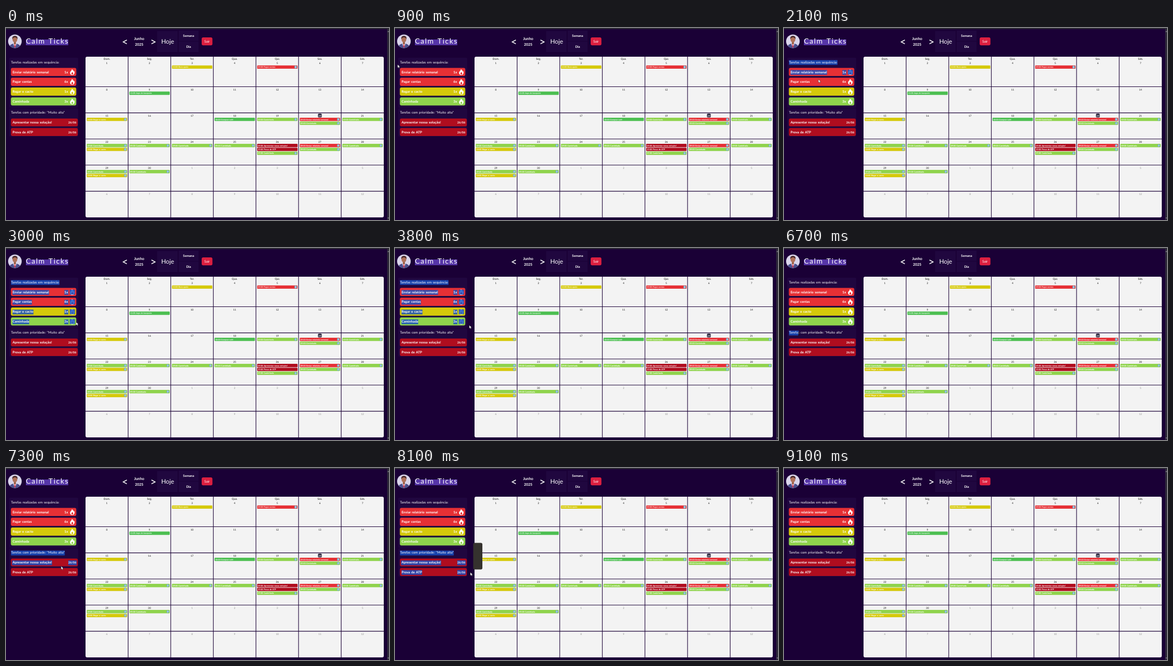
An HTML page for the animation above (9.4 s loop, 732x368 px).

```html
<!DOCTYPE html>
<html lang="pt">
<head>
<meta charset="utf-8">
<title>Agenda</title>
<style>
  html, body { margin: 0; width: 100%; height: 100%; overflow: hidden; background: #1a0036; }
  svg { display: block; }
  text { font-family: Lato, "Open Sans", sans-serif; word-spacing: .1em; white-space: pre; text-rendering: geometricPrecision; }
  .done { text-decoration: line-through; opacity: .75; }
</style>
</head>
<body>
<svg id="stage" width="732" height="368" viewBox="0 0 732 368"></svg>
<script>
const LOOP = 9400, STEP = 100;
const RED = '#e63035', YELLOW = '#d5c90b', LIME = '#8fd34c', GREEN = '#4dbf52', DARK = '#b00d1f';
const NIGHT = '#1a0036', PANEL = '#20073f';
const stage = document.getElementById('stage');

const rect = (x, y, w, h, fill, rx = 0, more = '') =>
  `<rect x="${x}" y="${y}" width="${w}" height="${h}" fill="${fill}" rx="${rx}" ${more}/>`;
const text = (x, y, str, size, { bold = true, fill = '#fff', anchor = 'start', more = '' } = {}) =>
  `<text x="${x}" y="${y}" font-size="${size}" font-weight="${bold ? 700 : 400}" fill="${fill}" text-anchor="${anchor}" ${more}>${str}</text>`;
const centered = (x, y, str, size, opts) => text(x, y, str, size, { anchor: 'middle', ...opts });
const pickable = { more: 'class="pick"' };

function header() {
  const person = `<clipPath id="round"><circle cx="17" cy="25.5" r="13"/></clipPath>
    <circle cx="17" cy="25.5" r="13" fill="#d9d5ea"/>
    <g clip-path="url(#round)">
      <path d="M6 40q0-9 8-10h6q8 1 8 10z" fill="#4a4f8c"/>
      <path d="M14 30h6l-3 8z" fill="#fff"/><path d="M16.3 31h1.4l.6 6h-2.6z" fill="#d8344f"/>
      <rect x="15" y="25" width="4" height="6" fill="#9c6248"/>
      <ellipse cx="17" cy="22" rx="4.6" ry="5.6" fill="#b0735a"/>
      <path d="M12 22q-1-7 5-7t5 7q-1-4-5-4t-5 4z" fill="#4a2a2c"/>
    </g>`;
  return person + rect(38, 22, 81, 11, '#5636a8') +
    text(38, 30.3, 'Calm Ticks', 14, { bold: false, more: 'letter-spacing="1.5"' }) +
    rect(289, 6, 39, 40, PANEL) + rect(330, 5, 38, 20, PANEL) + rect(330, 26, 38, 20, PANEL) +
    `<path d="M231 23l-7 3.7 7 3.7M278 23l7 3.7-7 3.7" fill="none" stroke="#fff" stroke-width="1.5"/>` +
    centered(254.5, 22.5, 'Junho', 7.3) + centered(254.5, 33.5, '2025', 7) +
    centered(309, 30.2, 'Hoje', 11.8, { bold: false }) +
    centered(349, 17.4, 'Semana', 6.1) + centered(349, 38.2, 'Dia', 6.1) +
    rect(374, 18, 20.5, 15.3, '#dc1f40', 3) + centered(384.2, 28, 'Sair', 6.4, { bold: false });
}

const flame = (cy, hole) => `<g class="pick" transform="translate(126.7 ${cy})">
  <path d="M-1-5.6q4 2 3.4 4.6 1-.5 1-1.7 1.4 2 .9 4.4-.8 3.7-4.3 3.7t-4.2-3.6q-.3-2.3 1.4-3.7 2-1.7 1.8-3.7z" fill="#fff"/>
  <path d="M0-.3q2.2 1.8 1.8 3.5-.4 1.4-1.8 1.4t-1.8-1.5q0-1.4 1.8-3.4z" fill="${hole}"/></g>`;

const streaks = [['Enviar relatório semanal', '1x', RED], ['Pagar contas', '6x', RED],
  ['Regar o cacto', '1x', YELLOW], ['Caminhada', '3x', LIME]];
const urgent = ['Apresentar nossa solução!', 'Prova de ATP'];
const streakY = i => 84.3 + 18.8 * i;
const urgentY = i => 181 + 18.4 * i;

function sidebarShapes() {
  return rect(6, 57, 132, 96, PANEL, 2) + rect(6, 154, 132, 54, PANEL, 2) +
    streaks.map(([, , color], i) =>
      rect(9.3, streakY(i) - 7.8, 125, 15.6, color, 3) + flame(streakY(i) + .3, color)).join('') +
    urgent.map((_, i) => rect(9.3, urgentY(i) - 7.6, 128, 15.2, DARK, 3)).join('');
}

function sidebarText() {
  const title = (y, str) => text(9.5, y, str, 6.4, { bold: false, ...pickable });
  return title(67.6, 'Tarefas realizadas em sequência:') +
    streaks.map(([name, count], i) => text(12.5, streakY(i) + 2.3, name, 6.4, pickable) +
      text(111.5, streakY(i) + 2.3, count, 6.4, pickable)).join('') +
    title(164.4, 'Tarefas com prioridade: "Muito alta"') +
    urgent.map((name, i) => text(12.5, urgentY(i) + 2.3, name, 6.4, pickable) +
      text(119, urgentY(i) + 2.2, '26/06', 5.5, pickable)).join('');
}

const LEFT = 152, COL = 570 / 7, TOP = 62.4, ROW = 50.1;

function eventBar(day, slot, label, color, repeats = true) {
  const x = LEFT + (day - 1) % 7 * COL + 2.3;
  const y = TOP + Math.floor((day - 1) / 7) * ROW + 9.3 + 7.4 * slot;
  const icon = rect(x + 71.3, y + .9, 4.6, 4.6, '#68a9cc', 1) +
    `<path d="M${x + 72.4} ${y + 3.1}q0-1.2 2.4-1M${x + 74.8} ${y + 3.3}q0 1.2-2.4 1" fill="none" stroke="#fff" stroke-width=".7"/>`;
  return rect(x, y, 77.2, 6.4, color, 1.2) +
    text(x + 1.3, y + 4.6, label, 3.85, { more: day < 22 ? 'class="done"' : '' }) + (repeats ? icon : '');
}

function calendar() {
  let out = rect(LEFT, 55, 570, 308, '#f3f3f3', 3), lines = '';
  for (let i = 1; i < 7; i++) lines += `M${LEFT + COL * i} 55v308`;
  for (let i = 1; i < 6; i++) lines += `M${LEFT} ${TOP + ROW * i}h570`;
  out += `<path d="${lines}" stroke="${NIGHT}" stroke-width="1.1"/>`;
  ['Dom.', 'Seg.', 'Ter.', 'Qua.', 'Qui.', 'Sex.', 'Sáb.'].forEach((name, i) =>
    out += centered(LEFT + COL * (i + .5), 60.7, name, 5.2, { bold: false, fill: '#111' }));
  for (let d = 1; d <= 42; d++) {
    const x = LEFT + COL * ((d - 1) % 7 + .5), y = TOP + ROW * Math.floor((d - 1) / 7);
    if (d === 20) out += rect(x - 3.5, y + 1.7, 7, 7, '#15102a', 1.5);
    out += centered(x, y + 7, d > 30 ? d - 30 : d, 4.8,
      { bold: d === 20, fill: d === 20 ? '#fff' : d > 30 ? '#8c8c8c' : '#111' });
  }
  const walk = (day, slot = 0) => eventBar(day, slot, '09:00 Caminhada', LIME);
  const water = (day, slot) => eventBar(day, slot, '10:00 Regar o cacto', YELLOW);
  const report = day => eventBar(day, 0, '09:00 Enviar relatório semanal', RED);
  return out + eventBar(3, 0, '12:00 Bom apoio', YELLOW, false) +
    eventBar(5, 0, '09:00 Pagar contas', RED) +
    eventBar(9, 0, '11:00 Jogo de basquete', GREEN, false) +
    eventBar(18, 0, '10:00 Comprar café', GREEN, false) +
    eventBar(26, 0, '09:00 Apresentar nossa solução!', DARK, false) +
    eventBar(26, 1, '19:00 Prova de ATP', DARK, false) +
    water(15, 0) + water(22, 1) + water(29, 1) + report(20) + report(27) +
    [19, 21, 22, 23, 24, 25, 28, 29, 30].map(d => walk(d)).join('') +
    walk(20, 1) + walk(26, 2) + walk(27, 1);
}

stage.innerHTML = rect(0, 0, 732, 368, NIGHT) + rect(0, 0, 732, 2, '#2a2933') +
  rect(728.5, 2, 3.5, 366, '#2c2738') +
  '<path d="M729.3 7.5l1.3-2 1.3 2zM729.3 363.5l1.3 2 1.3-2z" fill="#a8a8b0"/>' +
  header() + sidebarShapes() + '<g id="marks" fill="#1650c4" opacity=".82"></g>' + sidebarText() + calendar() +
  rect(149.5, 143.5, 17.5, 51, '#35322e', 3, 'id="popup"') +
  `<g id="pointer"><path id="arrow" d="M0 0v6.2l1.5-1.3 1 2.2 1.1-.5-1-2.1h2z" fill="#fff" stroke="#111" stroke-width=".4"/>
   <path id="beam" d="M-1.2-3.2h2.4M0-3.2v6.4M-1.2 3.2h2.4" fill="none" stroke="#111" stroke-width=".8"/></g>`;

const byId = id => document.getElementById(id);
const marks = byId('marks'), popup = byId('popup'), pointer = byId('pointer'), arrow = byId('arrow'), beam = byId('beam');

// One highlight box for each selectable piece
const boxes = [...stage.querySelectorAll('.pick')].map(el => {
  const b = el.getBBox(), shift = el.tagName === 'g';
  const x = shift ? 121.8 : b.x;
  const cy = shift ? el.transform.baseVal[0].matrix.f : b.y + b.height / 2;
  const node = document.createElementNS('http://www.w3.org/2000/svg', 'rect');
  node.setAttribute('x', x);
  node.setAttribute('y', cy - 4.6);
  node.setAttribute('height', 9.2);
  marks.append(node);
  return { node, x, w: shift ? 10 : b.width, top: cy - 4.6, bottom: cy + 4.6 };
});

// time, x, y
const route = [[600, 0, 100], [900, 5, 70], [1100, 5, 69], [1400, 8, 64], [1600, 8, 64], [2500, 112, 126],
  [2900, 134, 142], [3300, 134, 142], [3500, 154, 147], [3800, 142, 148], [5800, 142, 148],
  [6300, 8, 162], [6600, 8, 162], [6700, 28, 165], [7600, 144, 200], [9100, 144, 200]];

function pointerAt(t) {
  const i = Math.max(1, route.findIndex(p => p[0] >= t));
  const [t0, x0, y0] = route[i - 1], [t1, x1, y1] = route[i];
  const k = Math.max(0, (t - t0) / (t1 - t0));
  return { x: x0 + (x1 - x0) * k, y: y0 + (y1 - y0) * k };
}

const show = (el, on) => el.setAttribute('visibility', on ? 'visible' : 'hidden');

function render(t) {
  const visible = t >= 600 && t < 9100;
  const at = pointerAt(Math.min(t, 9100));
  const over = boxes.some(b => at.x >= b.x && at.x <= b.x + b.w && at.y >= b.top && at.y <= b.bottom);
  pointer.setAttribute('transform', `translate(${at.x} ${at.y})`);
  show(arrow, visible && !over);
  show(beam, visible && over);
  show(popup, t >= 7700 && t < 8400);

  const first = t >= 1600 && t < 4900, second = t >= 6700 && t < 8900;
  const end = pointerAt(Math.min(t, first ? 2900 : 7600));
  for (const b of boxes) {
    const inRange = first ? b.top < 150 : second && b.top > 150;
    const reach = end.y > b.bottom ? b.w : end.y < b.top ? 0 : Math.min(b.w, Math.max(0, end.x - b.x));
    b.node.setAttribute('width', inRange ? reach : 0);
  }
}

function tick() {
  render(Math.floor(performance.now() % LOOP / STEP) * STEP);
  requestAnimationFrame(tick);
}
tick();
</script>
</body>
</html>
```
